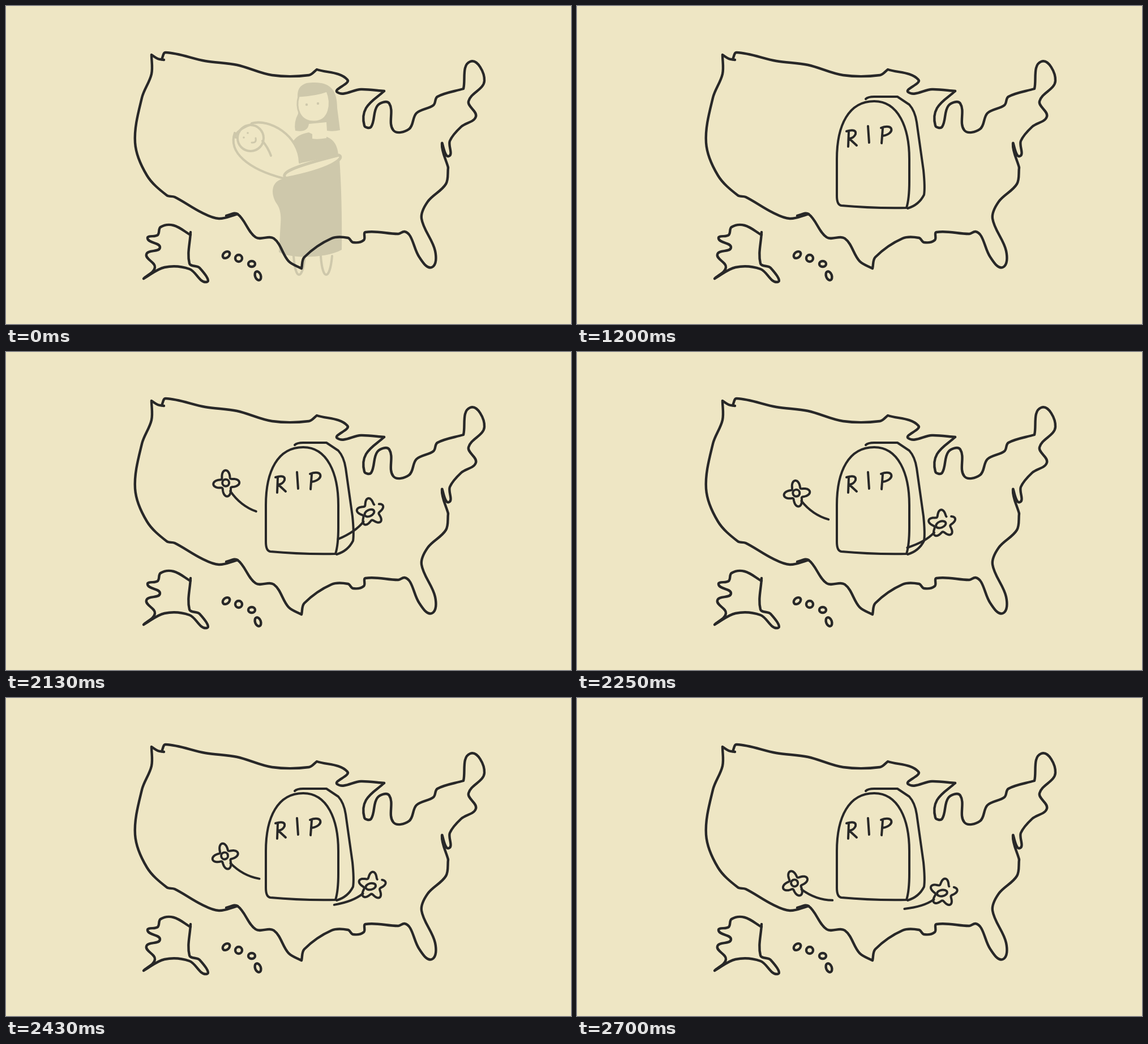
Write an HTML page with a canvas that moves like this. It is 998 px wide and 561 px high and loops after 2730 ms.

```html
<!DOCTYPE html>
<html lang="en">
<head>
<meta charset="utf-8">
<title>Map and headstone</title>
<style>
html, body { margin: 0; width: 100%; height: 100%; overflow: hidden; background: #eee6c4; }
canvas { display: block; width: 998px; height: 561px; }
</style>
</head>
<body>
<canvas id="stage" width="998" height="561"></canvas>
<script>
const ctx = document.getElementById('stage').getContext('2d');
const PAPER = '#eee6c4', INK = '#282828';
const LOOP = 2730, STEP = 30, STONE = 1110, FADED = 1200, DROP = 2010;
const TAU = Math.PI * 2, DEG = Math.PI / 180;

const shape = d => new Path2D(d);

// Smooth line through key points; a repeated point makes a corner.
function smooth(text) {
  const p = text.split(' ').map(s => s.split(',').map(Number));
  const at = i => p[Math.max(0, Math.min(p.length - 1, i))];
  const path = new Path2D();
  path.moveTo(...p[0]);
  for (let i = 0; i < p.length - 1; i++) {
    const [a, b, c, d] = [at(i - 1), at(i), at(i + 1), at(i + 2)];
    const reach = Math.hypot(c[0] - b[0], c[1] - b[1]) / 3;
    const handle = (from, to, k) => {
      const scale = reach / (Math.hypot(to[0] - from[0], to[1] - from[1]) || 1);
      return (to[k] - from[k]) * scale;
    };
    path.bezierCurveTo(
      b[0] + handle(a, c, 0), b[1] + handle(a, c, 1),
      c[0] - handle(b, d, 0), c[1] - handle(b, d, 1), ...c);
  }
  return path;
}

function oval(x, y, rx, ry = rx, turn = 0) {
  const path = new Path2D();
  path.ellipse(x, y, rx, ry, turn * DEG, 0, TAU);
  return path;
}

// Open outline with n lobes around the origin, the first one at angle `first`.
function petals(n, radius, depth, first, gap) {
  const path = new Path2D();
  const begin = first * DEG + Math.PI / n + gap;
  for (let a = 0; a <= TAU - gap; a += 0.04) {
    const angle = begin + a;
    const r = radius + depth * Math.cos(n * (angle - first * DEG));
    path.lineTo(r * Math.cos(angle), r * Math.sin(angle));
  }
  return path;
}

const land = [
  '279,95 268,93 257,86 257,86 257,120 240,162 228,241 249,299 284,334 298,337 345,364 376,375 409,367',
  '389,370 409,367 441,408 473,410 499,450 522,463 522,463 527,443 575,410 604,409 613,417 632,413 635,399 693,402 704,398 714,406 730,443 752,461 758,432 734,375 745,345 777,314 781,285',
  '781,285 770,243 782,265 784,238 804,213 830,195 817,168 845,132 820,98 808,146 808,146 762,160 755,175 725,189 712,217 684,219 677,172 656,176 645,213 633,211 636,180 668,150',
  '668,150 627,147 585,152 603,130 549,112 549,112 535,122 470,122 408,104 352,97 282,82 275,94',
  '326,399 324,454 342,462 354,487 324,464 280,461 243,481 243,481 263,461 248,438 272,426 250,410 268,404 273,390 296,387 326,404'
].map(smooth).concat(
  oval(389, 439, 7, 5, -40), oval(411, 445, 6, 6), oval(434, 455, 6, 5), oval(445, 476, 5, 8, -20));

const stoneSide = shape('M510 164 Q514 160 525 160 H566 L587 174 Q597 185 600 205 L612 290 Q615 320 613 333 Q604 351 584 357');
const stoneFront = shape('M587 270 V310 Q587 340 582 356 Q520 357 467 352 Q459 351 459 335 V270 C459 210 480 168 525 168 C568 168 587 215 587 270Z');
const letters = shape('M480 222 L479 248 M476 221 Q494 216 492 226 Q489 233 481 234 L494 246 M514 212 L516 241 M540 216 L538 242 M537 215 C560 206 562 226 540 229');

const hair = shape('M515 160 Q514 141 531 136 C570 131 585 145 585 180 L590 219 Q578 222 567 220 L566 205 L535 208 Q533 224 511 220 Q508 205 516 190Z');
const face = shape('M517 159 Q548 157 567 150 C576 172 572 204 544 204 C518 204 511 180 517 159Z');
const bodice = shape('M535 223 Q515 226 507 239 Q519 256 521 277 L587 263 Q585 238 567 231Z');
const neck = shape('M536 209 H566 V233 Q550 236 541 234 V226 L535 223Z');
const skirt = shape('M493 304 C465 308 468 335 479 350 Q487 362 485 385 L482 434 C500 446 565 446 593 430 Q594 340 589 270Z');
const arm = shape('M494 304 C484 294 505 284 588 263 C600 268 575 288 494 304Z');
const legs = [508, 556].map(x => shape(`M${x} 441 c3 44 16 44 20 0`));
const wrap = shape('M406 232 Q402 222 432 209 M434 207 C465 198 518 228 519 276 M404 224 C392 258 428 288 490 304 M453 238 Q463 250 468 264');
const smile = shape('M434 241 Q443 242 441 233');

// Each flower is drawn around its own head, which falls and turns.
const flowers = [
  {
    parts: [petals(4, 17, 6, -90, 0.15), oval(-1, -1, 6), shape('M6 14 Q22 41 49 53')],
    x: 390, y: 217, dx: -4.5, dy: 110, turn: -22.8, time: 690,
    ease: u => u ** 1.15
  },
  {
    parts: [petals(5, 19.5, 5, -105, 0.35), oval(-2, 2, 9, 5.5, -32), shape('M-11 18 Q-23 37 -53 53')],
    x: 643, y: 261, dx: 4.5, dy: 82, turn: 22.3, time: 510,
    ease: u => 1 - (1 - u) ** 1.12
  }
];

function stroke(paths, color, width) {
  ctx.strokeStyle = color;
  ctx.lineWidth = width;
  [].concat(paths).forEach(p => ctx.stroke(p));
}

function fill(paths, color) {
  ctx.fillStyle = color;
  [].concat(paths).forEach(p => ctx.fill(p));
}

function drawFamily(color) {
  stroke(legs, color, 4);
  fill([hair, bodice, skirt], color);
  fill([neck, face, arm], PAPER);
  stroke(face, color, 3);
  stroke(arm, color, 5);
  stroke([oval(432, 233, 23), wrap], color, 4);
  stroke(smile, color, 3);
  fill([oval(531, 174, 2.2), oval(551, 172, 2.2), oval(420, 232, 1.8), oval(427, 224, 1.8)], color);
}

function drawStone() {
  fill([stoneSide, stoneFront], PAPER);
  stroke([stoneSide, stoneFront, letters], INK, 4);
}

function drawFlower(flower, elapsed) {
  const u = Math.min(1, elapsed / flower.time);
  const fall = flower.ease(u);
  ctx.save();
  ctx.translate(flower.x + flower.dx * u, flower.y + flower.dy * fall);
  ctx.rotate(flower.turn * u * DEG);
  stroke(flower.parts, INK, 4);
  ctx.restore();
}

function draw(now) {
  const t = Math.floor(now % LOOP / STEP) * STEP;
  fill(shape('M0 0 H998 V561 H0Z'), PAPER);
  ctx.lineCap = ctx.lineJoin = 'round';
  if (t < FADED) drawFamily(t < STONE ? '#cec8ab' : '#ded7b8');
  stroke(land, INK, 4.4);
  if (t >= STONE) drawStone();
  if (t >= DROP) flowers.forEach(f => drawFlower(f, t - DROP));
}

const start = performance.now();
function tick() {
  draw(performance.now() - start);
  requestAnimationFrame(tick);
}
tick();
</script>
</body>
</html>
```
